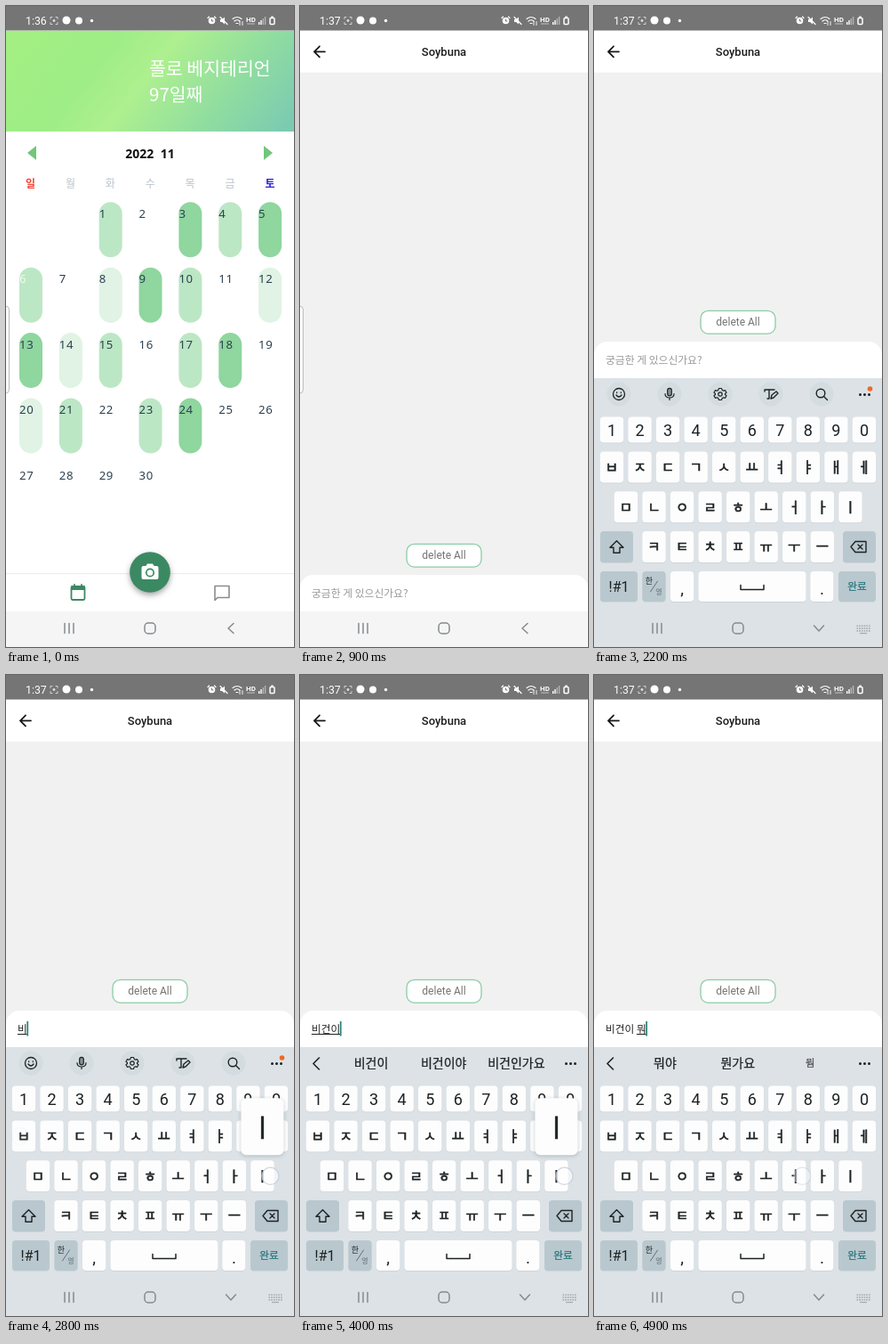
Animation of 324x720 px, one loop 5 s. Source, as an HTML page with a canvas:

```html
<!DOCTYPE html>
<html lang="ko">
<head>
<meta charset="utf-8">
<style>
html, body { margin: 0; width: 100%; height: 100%; overflow: hidden; background: #fff }
canvas { display: block; width: 324px; height: 720px }
</style>
</head>
<body>
<canvas id="stage"></canvas>
<script>
const canvas = document.getElementById('stage');
const ratio = window.devicePixelRatio || 1;
canvas.width = 324 * ratio;
canvas.height = 720 * ratio;
const ctx = canvas.getContext('2d');
ctx.scale(ratio, ratio);

const KOREAN = '"Noto Sans CJK KR", "Noto Sans CJK JP", "Noto Sans CJK", sans-serif';
const ROBOTO = 'Roboto, sans-serif';
const NOTO = '"Noto Sans", sans-serif';
const LOOP = 5000, INK = '#1d2224', GREEN = '#3b8962', TEAL = '#2c8880', BOARD = '#dce2e6';
const TOP = 27.4;

function box(x, y, w, h, fill, r = 0, stroke, width = 1) {
  ctx.beginPath();
  ctx.roundRect(x, y, w, h, r);
  if (fill) { ctx.fillStyle = fill; ctx.fill(); }
  if (stroke) { ctx.strokeStyle = stroke; ctx.lineWidth = width; ctx.stroke(); }
}
function disc(x, y, r, fill, stroke, width) {
  box(x - r, y - r, 2 * r, 2 * r, fill, r, stroke, width);
}
// y is the optical middle of the line; outline thickens the strokes; returns the text width
function text(s, x, y, size, color, { font = KOREAN, weight = 400, align = 'left', spacing = 0, outline = 0 } = {}) {
  ctx.font = `${weight} ${size}px ${font}`;
  ctx.textAlign = align;
  ctx.letterSpacing = spacing + 'px';
  ctx.fillStyle = ctx.strokeStyle = color;
  ctx.fillText(s, x, y + size * 0.36);
  if (outline) {
    ctx.lineWidth = outline;
    ctx.strokeText(s, x, y + size * 0.36);
  }
  return ctx.measureText(s).width;
}
const centered = (s, x, y, size, color, options) =>
  text(s, x, y, size, color, { align: 'center', ...options });
// draws path data centred on x, y
function icon(d, x, y, color, width, fill) {
  ctx.save();
  ctx.translate(x, y);
  ctx.lineCap = ctx.lineJoin = 'round';
  const path = new Path2D(d);
  if (fill) { ctx.fillStyle = fill; ctx.fill(path); }
  if (width) { ctx.strokeStyle = color; ctx.lineWidth = width; ctx.stroke(path); }
  ctx.restore();
}

function statusBar(t) {
  box(0, 0, 324, TOP, '#757575');
  text(t < 100 ? '1:36' : '1:37', 22, 16.5, 12.3, '#fff', { font: ROBOTO });
  icon('M-4-2V-4H-2 M2-4H4V-2 M4 2V4H2 M-2 4H-4V2', 54, 16.5, '#ddd', .9);
  disc(54, 16.5, 1.4, '#ddd');
  disc(68, 16, 4.5, '#fff');
  disc(82, 16.5, 4, '#fff');
  disc(96.5, 16.5, 1.7, '#fff');
  disc(231.5, 16.5, 3.2, '#fff', '#fff', 1.2);
  icon('M-4.5-3L-3-4.5 M4.5-3L3-4.5', 231.5, 16.5, '#fff', 1.2);
  icon('M0-1.5V.5H1.5', 231.5, 16.5, '#757575', 1);
  icon('M-4-1.5H-2L1-4V4L-2 1.5H-4Z', 245, 16.5, '#fff', 0, '#fff');
  icon('M-4-4L4 4', 245, 16.5, '#fff', 1.2);
  icon('M-5-2Q0-6 5-2 M-3 .5Q0-2 3 .5 M-1 3H1', 260, 16.5, '#fff', 1.2);
  icon('M3 1V5 M6 5V1', 260, 16.5, '#fff', .9);
  centered('HD', 275.5, 15, 8, '#fff', { font: ROBOTO, weight: 700 });
  icon('M-4 0H4', 275.5, 20, '#ccc', .9);
  for (let i = 0; i < 4; i++) box(284 + i * 2.3, 18 - i * 2, 1.4, 3 + i * 2, i < 2 ? '#fff' : '#b5b5b5');
  box(297, 13.5, 5, 7, null, 1, '#fff', 1.5);
  box(298.2, 11.5, 2.6, 1.5, '#fff');
}

function navBar(keyboard) {
  if (!keyboard) box(0, 680, 324, 40, '#f5f5f5');
  const gray = '#858a8d';
  icon('M-5-5.5V5.5 M0-5.5V5.5 M5-5.5V5.5', 71, 699, gray, 1.5);
  box(156, 693, 12, 12, null, 4, gray, 1.5);
  if (!keyboard) return icon('M3-5.5L-3 0L3 5.5', 253, 699, gray, 1.5);
  icon('M-5.5-3L0 3L5.5-3', 253, 699, gray, 1.5);
  for (let row = 0; row < 3; row++)
    for (let i = 0; i < 6; i++) box(295.5 + i * 2.7, 695.5 + row * 2.8, 1.6, 1.6, '#a4abaf');
  box(299, 704, 8, 1.2, '#a4abaf');
}

function edgeHandle() {
  box(-6, 337, 9.5, 98, '#fafafa', 4, '#bcbcbc', 1);
}

const LEVELS = '203232013201312023012023';
const PILLS = [, '#e0f3e5', '#bce7c5', '#8fd69f'];

function calendarPage() {
  box(0, TOP, 324, 680 - TOP, '#fff');
  const sky = ctx.createLinearGradient(40, -10, 284, 180);
  sky.addColorStop(0, '#a3ef83');
  sky.addColorStop(.3, '#9eed86');
  sky.addColorStop(.48, '#aef08f');
  sky.addColorStop(.75, '#90dda0');
  sky.addColorStop(1, '#7bcab2');
  box(0, TOP, 324, 141 - TOP, sky);
  text('폴로 베지테리언', 161, 70.5, 20.5, '#fff');
  text('97일째', 161, 99.5, 20.5, '#fff');

  icon('M-5 0L5-8V8Z', 29, 165, null, 0, '#72c67a');
  icon('M5 0L-5-8V8Z', 295, 165, null, 0, '#72c67a');
  centered('2022\u00a0\u00a011', 162, 165.5, 14, '#111', { font: NOTO, weight: 700 });
  [...'일월화수목금토'].forEach((name, i) => {
    const color = i === 0 ? '#f44336' : i === 6 ? '#2b20d8' : '#b9c2cb';
    centered(name, 27.5 + i * 44.9, 200, 12, color, { weight: i % 6 ? 400 : 700 });
  });
  for (let day = 1; day <= 30; day++) {
    const x = 15 + (day + 1) % 7 * 44.85;
    const y = 220.3 + Math.floor((day + 1) / 7) * 73.4;
    const level = +LEVELS[day - 1];
    if (level) box(x, y, 26, 62, PILLS[level], 13);
    text(day, x, y + 13, 13.2, day === 6 ? '#f2fbf4' : '#2d4150', { font: NOTO, spacing: .6 });
  }

  box(0, 637, 324, 1.2, '#e8eff2');
  box(73.5, 652, 15, 15, null, 1.5, GREEN, 1.8);
  box(73, 651.5, 16, 4.5, GREEN);
  icon('M-4-9.5V-7 M4-9.5V-7', 81, 659.5, GREEN, 1.8);
  icon('M-8-8H8V5H-5L-8 8Z', 243, 659.5, '#8c8c8c', 1.6);

  ctx.save();
  ctx.shadowColor = 'rgba(0,0,0,.35)';
  ctx.shadowBlur = 6 * ratio;
  ctx.shadowOffsetY = 3 * ratio;
  disc(162, 636, 22.8, GREEN);
  ctx.restore();
  box(152.5, 629, 19, 15, '#fff', 2);
  icon('M-5 0L-3-3H3L5 0Z', 162, 629.5, null, 0, '#fff');
  disc(162, 636.5, 4.2, '#fff', GREEN, 1.7);
}

// inputTop is the upper edge of the message field
function chatPage(inputTop) {
  box(0, TOP, 324, 680 - TOP, '#f1f1f1');
  box(0, TOP, 324, 74.8 - TOP, '#fff');
  icon('M6 0H-6 M0-6L-6 0L0 6', 22, 51.3, '#181818', 1.8);
  centered('Soybuna', 162, 51.8, 13, '#1c1c1e', { font: ROBOTO, weight: 500 });
  box(120, inputTop - 34.7, 84, 25.8, '#fff', 8.5, '#8bcda6', 1.3);
  centered('delete All', 162, inputTop - 22, 12, '#757575', { font: ROBOTO });
  box(0, inputTop, 324, 41.5, '#fff', [15, 15, 0, 0]);
}

// time, key, finished words, word in progress, suggestions
const STROKES = [
  [2530, 'ㅂ', '', 'ㅂ', []],
  [2740, 'ㅣ', '', '비', ['비건', '비가', '비밀번호']],
  [3100, 'ㄱ', '', '빅', ['빅', '빅스', '비교']],
  [3340, 'ㅓ', '', '비거', ['비건', '비거', '비건은']],
  [3540, 'ㄴ', '', '비건', ['비건', '비건은', '비건이']],
  [3700, 'ㅇ', '', '비겅', ['비겅', '비건이', '비건은']],
  [3890, 'ㅣ', '', '비건이', ['비건이', '비건이야', '비건인가요']],
  [4270, ' ', '비건이 ', '', ['뭐야', '아니', '있는']],
  [4400, 'ㅁ', '비건이 ', 'ㅁ', ['뭐야', '뭐', '만']],
  [4550, 'ㅜ', '비건이 ', '무', ['무슨', '무엇', '뭐야']],
  [4700, 'ㅓ', '비건이 ', '뭐', ['뭐야', '뭔가요', '뭠']],
];
const strokeAt = t => STROKES.filter(s => s[0] <= t).pop();

function messageField(t, middle) {
  const stroke = strokeAt(t);
  let x = 13;
  if (stroke) {
    x += text(stroke[2], x, middle, 11.7, '#222');
    const width = text(stroke[3], x, middle, 11.7, '#222');
    if (width) box(x, middle + 5.5, width, 1, '#222');
    x += width;
  } else {
    text('궁금한 게 있으신가요?', x, middle, 11.8, '#9a9a9a');
  }
  const since = t - (stroke ? stroke[0] : 1580);
  if (t >= 1580 && since % 1000 < 500) box(x - .4, middle - 8.5, 1.8, 16.5, TEAL);
}

const ROWS = [
  ['1234567890', 20, 461.5, 29],
  ['ㅂㅈㄷㄱㅅㅛㅕㅑㅐㅔ', 20, 500.5, 35],
  ['ㅁㄴㅇㄹㅎㅗㅓㅏㅣ', 36, 545.3, 35],
  ['ㅋㅌㅊㅍㅠㅜㅡ', 67.5, 590, 35],
];
const PITCH = 31.55;

function keyPlace(key) {
  if (key === ' ') return { x: 195, top: 635, height: 34 };
  const [keys, first, top, height] = ROWS.find(row => row[0].includes(key));
  return { x: first + keys.indexOf(key) * PITCH, top, height };
}
function keyCap(x, y, w, h, special) {
  box(x, y + .8, w, h, '#c9d1d6', 4);
  box(x, y, w, h, special ? '#b9c8ce' : '#fdfdfd', 4);
}

const GEAR = 'M-1.5-6.5H1.5L2.2-4.6L3.6-3.8L5.6-4.3L7-1.7L5.5-.6V.6L7 1.7L5.6 4.3L3.6 3.8L2.2 4.6'
  + 'L1.5 6.5H-1.5L-2.2 4.6L-3.6 3.8L-5.6 4.3L-7 1.7L-5.5 .6V-.6L-7-1.7L-5.6-4.3L-3.6-3.8L-2.2-4.6Z';

function toolbar() {
  [28, 85, 142, 199, 256].forEach(x => disc(x, 436, 13.5, '#d4dce0'));
  disc(28, 436, 6.5, null, INK, 1.3);
  icon('M-3 1Q0 5 3 1 M-2.3-2V-1.5 M2.3-2V-1.5', 28, 436, INK, 1.3);
  box(82.7, 429.3, 4.6, 8.5, '#8a9195', 2.3, INK, 1.2);
  icon('M-5-.5Q-5 4 0 4Q5 4 5-.5 M0 4V6.5', 85, 436, INK, 1.2);
  icon(GEAR, 142, 436, INK, 1.2);
  disc(142, 436, 2.2, null, INK, 1.2);
  icon('M-7-3V-5H4 M-2-5V5H-4 M0 5L1 1L6-3L8-1L3 4Z', 199, 436, INK, 1.4);
  disc(255, 435, 4.8, null, INK, 1.4);
  icon('M0 0L4 4', 258.5, 438.5, INK, 1.4);
  disc(310.5, 430, 2.8, '#f26722');
}

function suggestions(words) {
  icon('M3-6.5L-3.5 0L3 6.5', 18.5, 436.5, INK, 1.6);
  words.forEach((word, i) => {
    const rare = word === '뭠';
    centered(word, 80 + i * 81.7, 436, rare ? 11 : 14, rare ? '#555' : INK, { outline: .25 });
  });
}

function keyboard(t, drop) {
  ctx.save();
  ctx.translate(0, drop);
  box(0, 418, 324, 302, BOARD);
  const shown = strokeAt(t - 100);
  if (shown && shown[4].length) suggestions(shown[4]);
  else toolbar();
  [299.5, 304.5, 309.5].forEach(x => disc(x, 436.5, 1.5, INK));

  ROWS.forEach(([keys, first, top, height], row) => [...keys].forEach((key, i) => {
    const x = first + i * PITCH;
    keyCap(x - 13.2, top, 26.4, height);
    centered(key, x, top + height / 2 + .3, row ? 15.5 : 18, INK,
      row ? { outline: .6 } : { font: ROBOTO });
  }));
  keyCap(7, 590, 37, 35, true);
  icon('M0-7L7.5 .5H3.5V6.5H-3.5V.5H-7.5Z', 25.5, 607.8, INK, 1.4);
  keyCap(280, 590, 37, 35, true);
  icon('M-9 0L-4-6H8V6H-4Z M-1-2.5L4 2.5 M4-2.5L-1 2.5', 298, 607.5, INK, 1.4);

  keyCap(7, 635, 42, 34, true);
  centered('!#1', 28, 652, 16, INK, { font: ROBOTO });
  keyCap(54.5, 635, 26, 34, true);
  centered('한', 62, 646, 9, INK);
  icon('M-4 6L4-6', 67.5, 652, '#667378', 1);
  centered('영', 73, 658, 8, '#667378');
  keyCap(86, 635, 26.3, 34);
  centered(',', 99, 654, 19, INK, { font: ROBOTO });
  keyCap(117.5, 635, 121, 34);
  icon('M-13-2.5V2.5H13V-2.5', 178, 653, INK, 1.5);
  keyCap(243.3, 635, 26, 34);
  centered('.', 256.5, 654, 19, INK, { font: ROBOTO });
  keyCap(275, 635, 42, 34, true);
  centered('완료', 296, 652, 11.7, '#28777e', { outline: .25 });
  ctx.restore();

  const pressed = strokeAt(t);
  if (pressed && pressed[1] !== ' ' && t - pressed[0] < 190) keyPopup(pressed[1]);
}

function keyPopup(key) {
  const { x, top } = keyPlace(key);
  const left = Math.max(3, x - 24);
  ctx.save();
  ctx.shadowColor = 'rgba(40,60,70,.25)';
  ctx.shadowBlur = 4 * ratio;
  ctx.shadowOffsetY = ratio;
  box(left, top - 70, 48, 64, '#fdfdfd', 6);
  ctx.restore();
  centered(key, left + 24, top - 36, 28, INK, { outline: .9 });
}

// start, duration, x, y
const TOUCHES = [
  [100, 430, 256.5, 655],
  [1390, 260, 150, 655],
  ...STROKES.map(([time, key]) => {
    const { x, top, height } = keyPlace(key);
    return [time, 290, key === 'ㅂ' ? x - 4 : x + 9, top + height / 2];
  }),
];

function touches(t) {
  for (const [start, duration, x, y] of TOUCHES) {
    const p = (t - start) / duration;
    if (p < 0 || p >= 1) continue;
    const alpha = Math.min(1, (1 - p) * 2);
    disc(x, y, 9.6, `rgba(255,255,255,${.6 * alpha})`, `rgba(190,196,214,${.7 * alpha})`, 1.2);
  }
}

const clamp = v => Math.max(0, Math.min(1, v));

function zoomed(scale, alpha, draw) {
  ctx.save();
  ctx.globalAlpha = alpha;
  ctx.translate(162, 354);
  ctx.scale(scale, scale);
  ctx.translate(-162, -354);
  draw();
  ctx.restore();
}

function render(t) {
  ctx.clearRect(0, 0, 324, 720);
  const open = 1 - (1 - clamp((t - 470) / 400)) ** 3;
  const typing = t >= 1500;
  const inputTop = t >= 1580 ? 377 : 639;

  ctx.save();
  ctx.beginPath();
  ctx.rect(0, TOP, 324, 680 - TOP);
  ctx.clip();
  if (open < 1) zoomed(1 + .1 * open, 1, calendarPage);
  if (open > 0) zoomed(.85 + .15 * open, open, () => {
    chatPage(inputTop);
    messageField(t, inputTop + 20.5);
  });
  ctx.restore();

  if (inputTop === 377) box(0, 418, 324, 302, '#fafafa');
  if (typing) keyboard(t, 302 * (1 - clamp((t - 1500) / 300)) ** 2);
  navBar(typing);
  if (t < 1800) edgeHandle();
  statusBar(t);
  touches(t);
}

function tick() {
  render(performance.now() % LOOP);
  requestAnimationFrame(tick);
}
tick();
</script>
</body>
</html>
```
